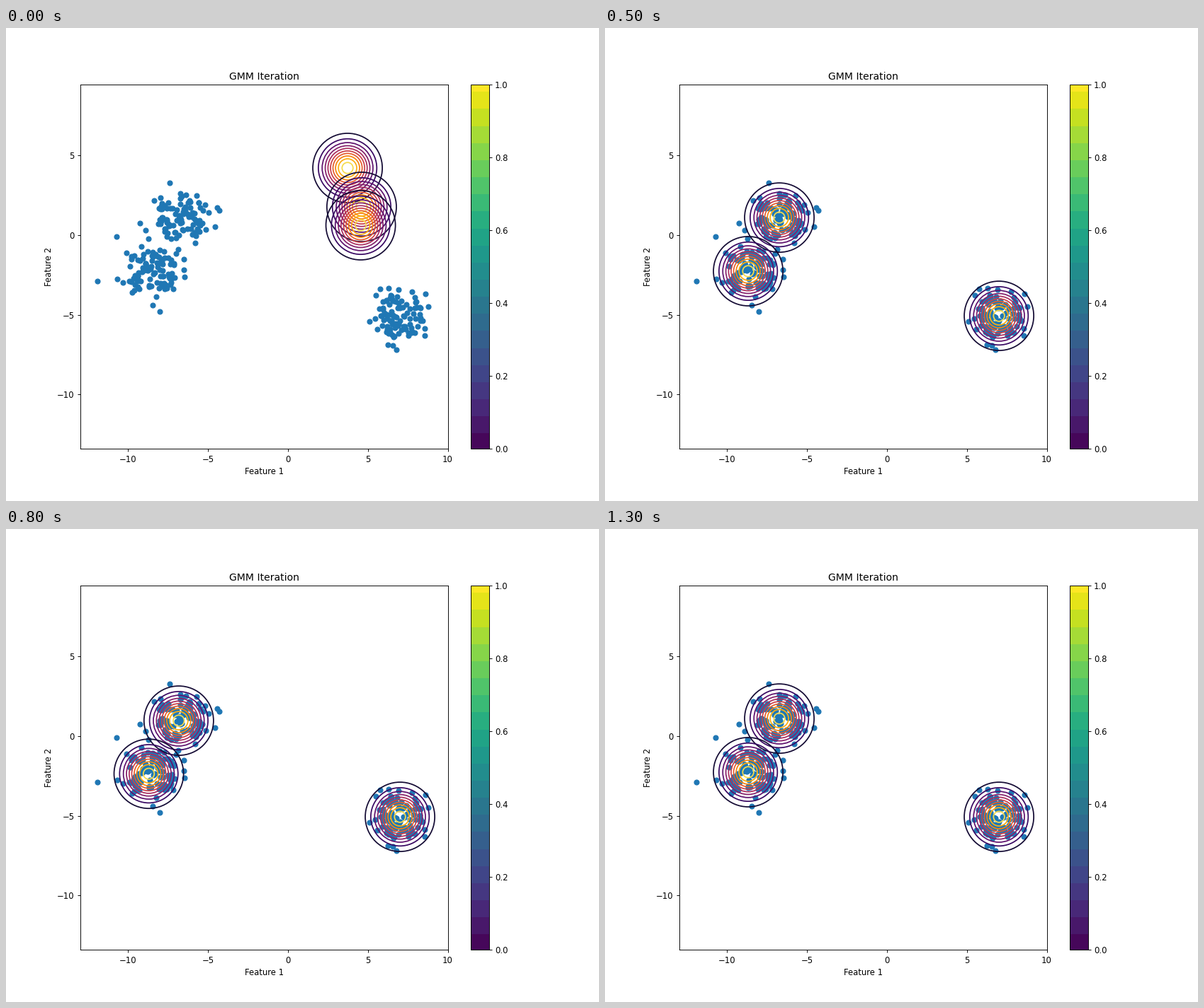
Animation, 837 px wide and 669 px high, one loop 1400 ms. Source, as a matplotlib script:

```python
import numpy as np
import matplotlib.pyplot as plt
from matplotlib.animation import FuncAnimation
from matplotlib.cm import ScalarMappable
from matplotlib.colors import ListedColormap
from matplotlib.patches import Circle

DPI = 83.7
FRAMES, INTERVAL = 14, 100
RESTART = 6      # frame where the fit starts over
DECAY = 0.345    # share of the remaining error kept by each iteration

START = np.array([(3.73, 4.20), (4.61, 1.76), (4.55, 0.61)])
FITTED = np.array([(-6.73, 1.09), (-8.68, -2.27), (7.01, -5.07)])
LAG = np.array([(-0.29, -0.38), (-0.07, -0.29), (0, 0)])

# The few points that stand clear of each cluster's dense core.
UPPER_EDGE = [(-7.40, 3.27), (-6.73, 2.60), (-7.97, 2.34), (-8.37, 2.16),
              (-5.71, 2.47), (-5.18, 1.89), (-4.43, 1.72), (-4.30, 1.54),
              (-4.56, 0.52), (-4.96, 1.41), (-5.14, 0.34), (-5.80, -0.50),
              (-9.26, 0.74), (-8.90, 0.30), (-8.73, -0.23), (-10.72, -0.10)]
LOWER_EDGE = [(-11.92, -2.89), (-10.68, -2.76), (-10.32, -2.98), (-10.10, -1.12),
              (-9.75, -3.60), (-8.46, -4.40), (-8.02, -4.80), (-8.24, -3.87),
              (-7.18, -3.38), (-6.47, -2.63), (-6.51, -2.19), (-6.51, -1.52),
              (-6.87, -0.90), (-7.00, -1.17), (-9.17, -0.72)]
RIGHT_EDGE = [(5.77, -3.38), (6.30, -3.34), (5.50, -3.78), (6.92, -3.43),
              (7.76, -3.56), (8.60, -3.69), (8.78, -4.49), (5.72, -4.62),
              (5.46, -5.24), (5.10, -5.42), (5.59, -5.91), (6.25, -6.88),
              (6.56, -6.93), (6.79, -7.19), (8.56, -6.31), (8.56, -5.86)]


def cluster_points(rng, center, radius, edge, total=100):
    count = total - len(edge)
    angle = rng.uniform(0, 2 * np.pi, count)
    r = radius * rng.uniform(0, 1, count) ** 0.6
    core = np.column_stack([r * np.cos(angle), r * np.sin(angle)]) + center
    return np.vstack([core, edge])


def banded_viridis(first=0.04, step=0.0471):
    t = np.linspace(0, 1, 256)
    middle = first + (np.floor((t - first) / step) + 0.5) * step
    return ListedColormap(plt.get_cmap("viridis")(np.clip(middle, 0, 1)))


def add_rings(ax):
    """Contour circles of a unit normal density at evenly spaced levels."""
    levels = np.arange(1, 11) * 0.015
    radii = np.sqrt(-2 * np.log(levels * 2 * np.pi))
    colors = plt.get_cmap("inferno")(levels / 0.165)
    return [ax.add_patch(Circle((0, 0), r, fill=False, ec=c, lw=1.5, zorder=2))
            for r, c in zip(radii, colors)]


def means_at(i):
    if i == 0:
        return START
    power = i + 1 if i < RESTART else i - RESTART - 1
    return FITTED + LAG * DECAY ** power


# The small margin keeps the pixel size from rounding down.
fig, ax = plt.subplots(figsize=(837.01 / DPI, 669.01 / DPI), dpi=DPI)
rng = np.random.RandomState(4)
points = np.vstack([
    cluster_points(rng, (-6.70, 1.10), 1.50, UPPER_EDGE),
    cluster_points(rng, (-8.60, -2.30), 1.60, LOWER_EDGE),
    cluster_points(rng, (7.10, -5.05), 1.45, RIGHT_EDGE),
])
ax.scatter(points[:, 0], points[:, 1], color="#1f77b4")
fig.colorbar(ScalarMappable(cmap=banded_viridis()), ax=ax)

components = [add_rings(ax) for _ in START]
ax.set(xlim=(-13, 10), ylim=(-13.417, 9.417), title="GMM Iteration",
       xlabel="Feature 1", ylabel="Feature 2")


def update(i):
    for rings, mean in zip(components, means_at(i)):
        for ring in rings:
            ring.set_center(mean)
    return [ring for rings in components for ring in rings]


anim = FuncAnimation(fig, update, frames=FRAMES, interval=INTERVAL,
                     repeat=True, repeat_delay=0)
plt.show()
```
